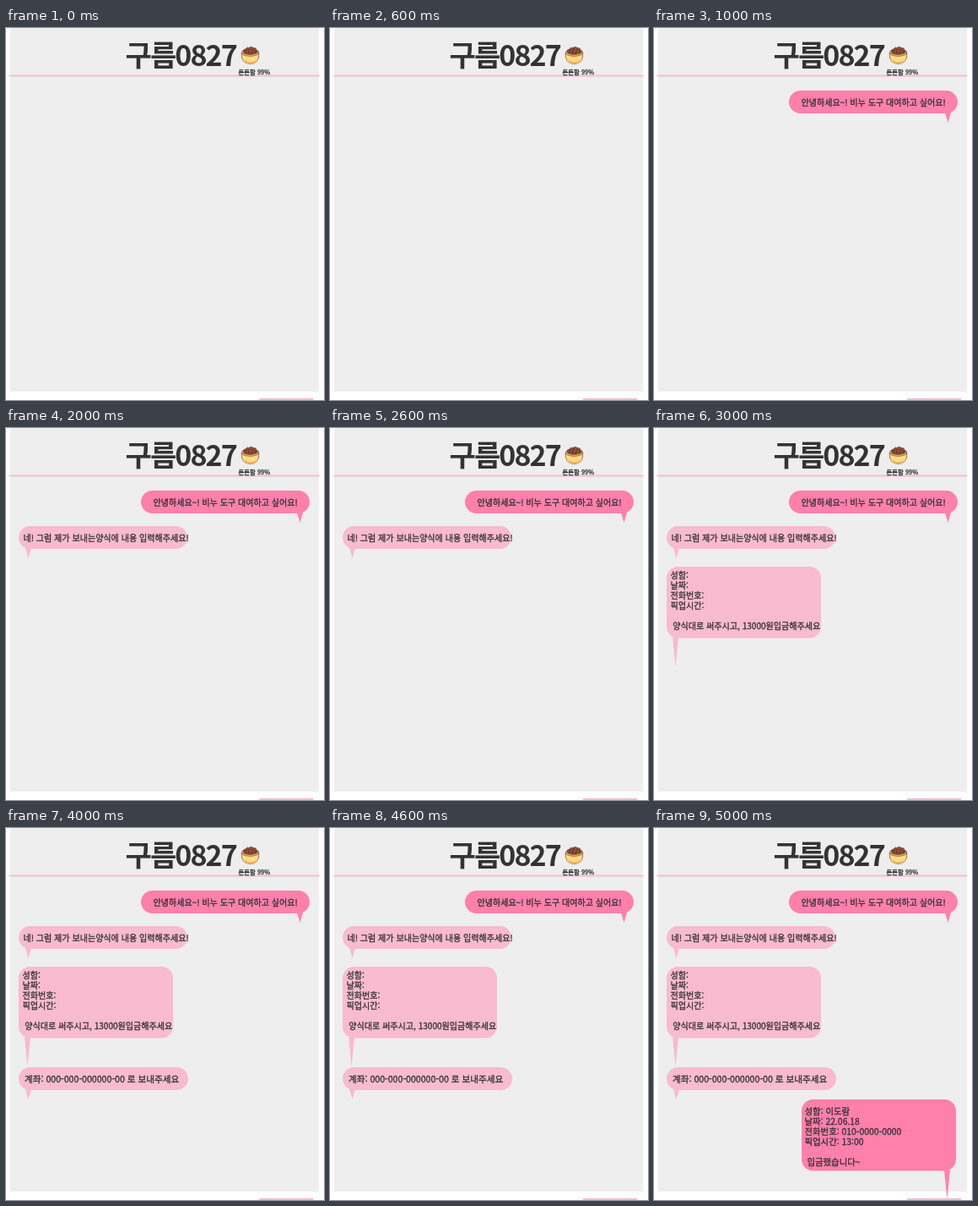
These frames come from a looping animation (377 px wide and 440 px high, 6000 ms). An HTML page:

```html
<!DOCTYPE html>
<html lang="ko">
<head>
<meta charset="utf-8">
<title>대여 채팅</title>
<style>
  html, body { margin: 0; width: 100%; height: 100%; overflow: hidden; background: #fff; }
  svg { display: block; width: 377px; height: 440px; }
  text {
    font: 500 10.05px "Noto Sans CJK KR", "Noto Sans CJK", sans-serif;
    fill: #333;
    stroke: #333;
    stroke-width: .3px;
    white-space: pre;
  }
  .title { font-size: 34px; font-weight: 700; letter-spacing: -1.9px; stroke: none; }
  .status { font-size: 7.4px; }
</style>
</head>
<body>
<svg viewBox="0 0 377 440">
  <rect x="5" width="366" height="430" fill="#eee"/>
  <path d="M4 56.4H371.5M300 439H364" stroke="#f8bbd0" stroke-width="2"/>
  <text class="title" x="141.5" y="45">구름0827</text>
  <text class="status" x="275.5" y="54.5">든든함 99%</text>

  <g id="cake" stroke="#70452e" stroke-width=".7">
    <path d="M279.3 29Q278 42 289.5 42.6Q301 42 299.7 29Z" fill="#ffdc83"/>
    <path d="M280 37Q289.5 43.5 299 37Q297 42.5 289.5 42.5Q282 42.5 280 37Z" fill="#efb568" stroke="none"/>
    <ellipse cx="289.5" cy="29" rx="10.2" ry="4.3" fill="#f4bd70"/>
    <path d="M281 28Q281 25 284 25Q285 22 288 23.5Q291 21 293 23.5Q297 23 297 26Q300 28 297 30Q289 33 282 30Z" fill="#8c4c36"/>
    <path d="M284 27h1M288 25.5h1M292 26h1M295 28h1M287 29h1M291 29.5h1" stroke="#452319" stroke-width="1.5"/>
  </g>
  <g id="chat"></g>
</svg>
<script>
const PINK = "#ff80ab", PALE = "#f8bbd0";
const STEP = 1000, LOOP = 6000, LINE_HEIGHT = 12;

const messages = [
  { x: 160, y: 74, w: 200, h: 27, color: PINK, tailX: 345, tail: 11, textX: 174.5, textY: 92,
    lines: ["안녕하세요~! 비누 도구 대여하고 싶어요!"] },
  { x: 15, y: 116, w: 200, h: 27, color: PALE, tailX: 23, tail: 11, textX: 20.5, textY: 134,
    lines: ["네! 그럼 제가 보내는양식에 내용 입력해주세요!"] },
  { x: 15, y: 164, w: 183, h: 84.5, color: PALE, tailX: 22, tail: 33.5, textX: 19.5, textY: 178,
    lines: ["성함:", "날짜:", "전화번호:", "픽업시간:", "", " 양식대로 써주시고, 13000원입금해주세요"] },
  { x: 15, y: 283, w: 201, h: 27, color: PALE, tailX: 23, tail: 11, textX: 22, textY: 301, size: 10.6,
    lines: ["계좌: 000-000-000000-00 로 보내주세요"] },
  { x: 175, y: 321, w: 183, h: 84.5, color: PINK, tailX: 344, tail: 33.5, textX: 178.5, textY: 339, size: 10.4,
    lines: ["성함: 이도람", "날짜: 22.06.18", "전화번호: 010-0000-0000", "픽업시간: 13:00", "", " 입금했습니다~"] }
];

function bubble({ x, y, w, h, color, tailX, tail, textX, textY, size = 10.05, lines }) {
  const bottom = y + h;
  const text = lines.map((line, i) =>
    `<text x="${textX}" y="${textY + i * LINE_HEIGHT}" style="font-size:${size}px">${line}</text>`);
  return `<g visibility="hidden">
    <rect x="${x}" y="${y}" width="${w}" height="${h}" rx="13.5" fill="${color}"/>
    <path d="M${tailX} ${bottom - 1}h7l-3.5 ${tail + 1}z" fill="${color}"/>
    ${text.join("")}</g>`;
}

const chat = document.getElementById("chat");
chat.innerHTML = messages.map(bubble).join("");
const bubbles = [...chat.children];

function draw() {
  const step = Math.floor(performance.now() % LOOP / STEP);
  bubbles.forEach((b, i) => b.setAttribute("visibility", i < step ? "visible" : "hidden"));
  requestAnimationFrame(draw);
}
draw();
</script>
</body>
</html>
```
